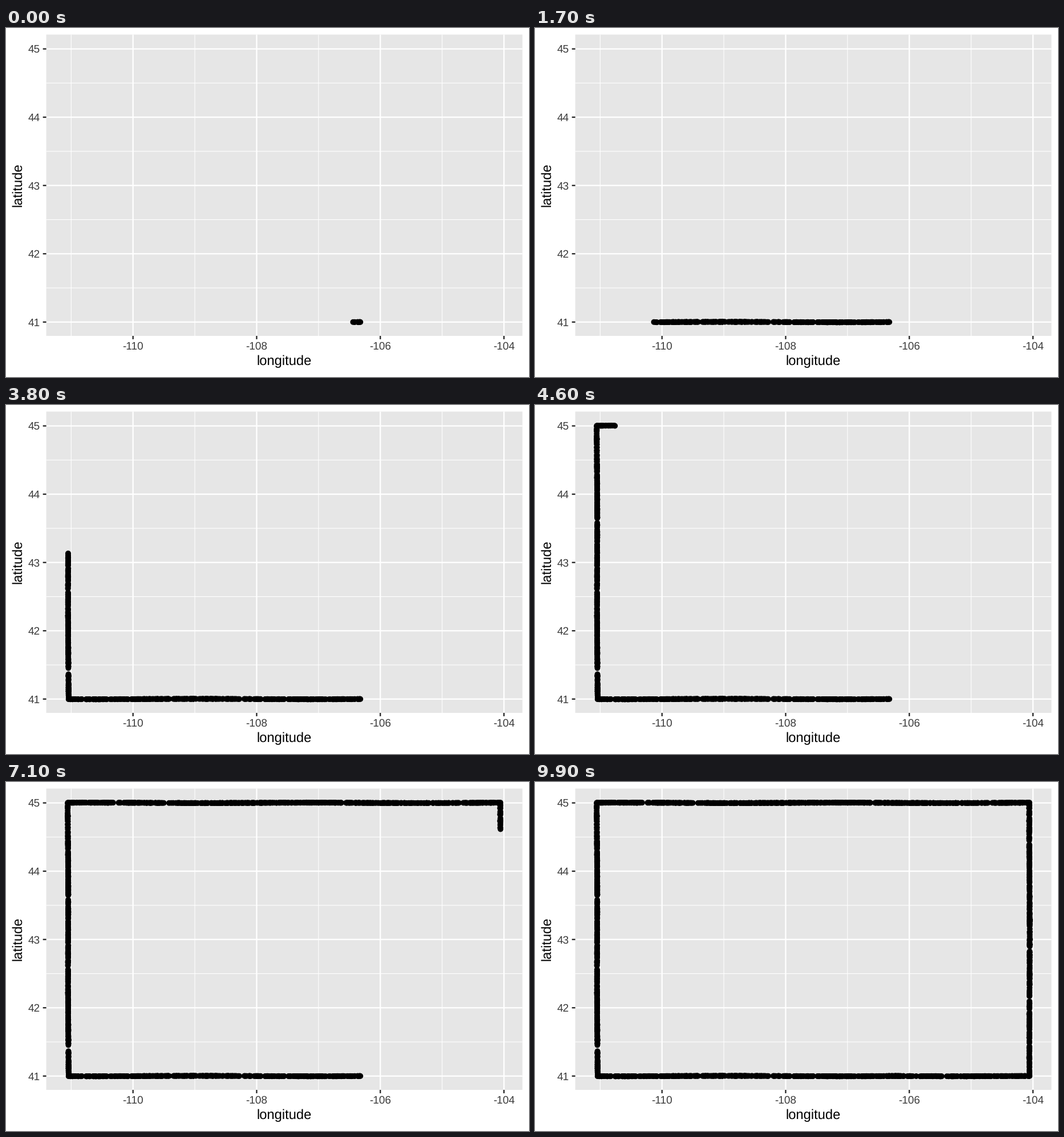
These frames come from a looping animation (917 by 611 pixels, 10 s). A matplotlib script:

```python
import numpy as np
import matplotlib.pyplot as plt
from matplotlib.animation import FuncAnimation
from matplotlib.patches import Rectangle

W, H, DPI = 917, 611, 64
PT = 72 / DPI  # points per pixel
FRAMES, INTERVAL = 100, 100
LEFT, RIGHT, TOP, BOTTOM = 70.6, 905.5, 11.5, 539.0
MAJOR, MINOR = 2.3, 1.15  # grid line widths

plt.rcParams["font.family"] = "Liberation Sans"
plt.rcParams["text.hinting"] = "none"
fig = plt.figure(figsize=(W / DPI, H / DPI), dpi=DPI, facecolor="white")
ax = fig.add_axes([0, 0, 1, 1])
ax.set_xlim(0, W)
ax.set_ylim(H, 0)
ax.axis("off")


def lon_px(lon):
    return 222.7 + 108.4 * (lon + 110)


def lat_px(lat):
    return 514.8 - 119.55 * (lat - 41)


def line(xs, ys, color, width, z):
    ax.plot(xs, ys, color=color, lw=width * PT, solid_capstyle="butt",
            snap=False, zorder=z)


def label(x, y, text, size, color, ha="center", rotation=0):
    ax.text(x, y, text, fontsize=size * PT, color=color, ha=ha,
            va="baseline", rotation=rotation, rotation_mode="anchor")


# Panel, grid and axes
ax.add_patch(Rectangle((LEFT, TOP), RIGHT - LEFT, BOTTOM - TOP,
                       facecolor="#e6e6e6", lw=0, snap=False, zorder=0))
for lon in range(-111, -103):
    major = lon % 2 == 0
    x = lon_px(lon)
    line([x, x], [TOP, BOTTOM], "white", MAJOR if major else MINOR, 1 + major)
    if major:
        line([x, x], [BOTTOM, BOTTOM + 5.9], "#242424", MAJOR, 3)
        label(x, 563.3, str(lon), 19, "#3c3c3c")
for half in range(82, 91):
    major = half % 2 == 0
    y = lat_px(half / 2)
    line([LEFT, RIGHT], [y, y], "white", MAJOR if major else MINOR, 1 + major)
    if major:
        line([LEFT - 5.9, LEFT], [y, y], "#242424", MAJOR, 3)
        label(60, y + 6.7, str(half // 2), 19, "#3c3c3c", ha="right")
label(488, 590, "longitude", 23.7, "black")
label(27.4, 275.2, "latitude", 23.7, "black", rotation=90)

# Border, clockwise from the middle of the south side
START = (621.5, 514.8)
PATH = np.array([START, (109.6, 514.8), (108.4, 36.5),
                 (867, 36.5), (867.2, 514.8), START])
ARC = np.r_[0, np.cumsum(np.hypot(*np.diff(PATH, axis=0).T))]


def at(s):
    return np.column_stack([np.interp(s, ARC, side) for side in PATH.T])


# Survey points at random distances, with a slight drift off the straight line
rng = np.random.default_rng(7)
steps = np.cumsum(rng.exponential(1.5, 2000))
steps = np.sort(np.r_[ARC, steps[steps < ARC[-1]]])
drift = 0.35 * np.sin(steps / 60)[:, None]
points = at(steps) + drift + rng.normal(0, 0.12, (len(steps), 2))
sizes = (rng.uniform(9.85, 10.05, len(steps) + 1) * PT) ** 2

# Distance covered over time: the survey is sparser on the north-west stretch
KEYS, REACH = zip((0, 13), (17, 413), (33, 655), (44, 901), (46, 1022),
                  (55, 1429), (66, 1671), (83, 2092), (88, 2168),
                  (FRAMES - 1, ARC[-1]))

dots = ax.scatter([], [], c="black", linewidths=0, zorder=4)


def draw(frame):
    head = np.interp(frame, KEYS, REACH)
    shown = np.vstack([points[steps <= head], at([head])])
    dots.set_offsets(shown)
    dots.set_sizes(sizes[:len(shown)], DPI)
    return (dots,)


anim = FuncAnimation(fig, draw, frames=FRAMES, interval=INTERVAL,
                     repeat=True, repeat_delay=0)
plt.show()
```
